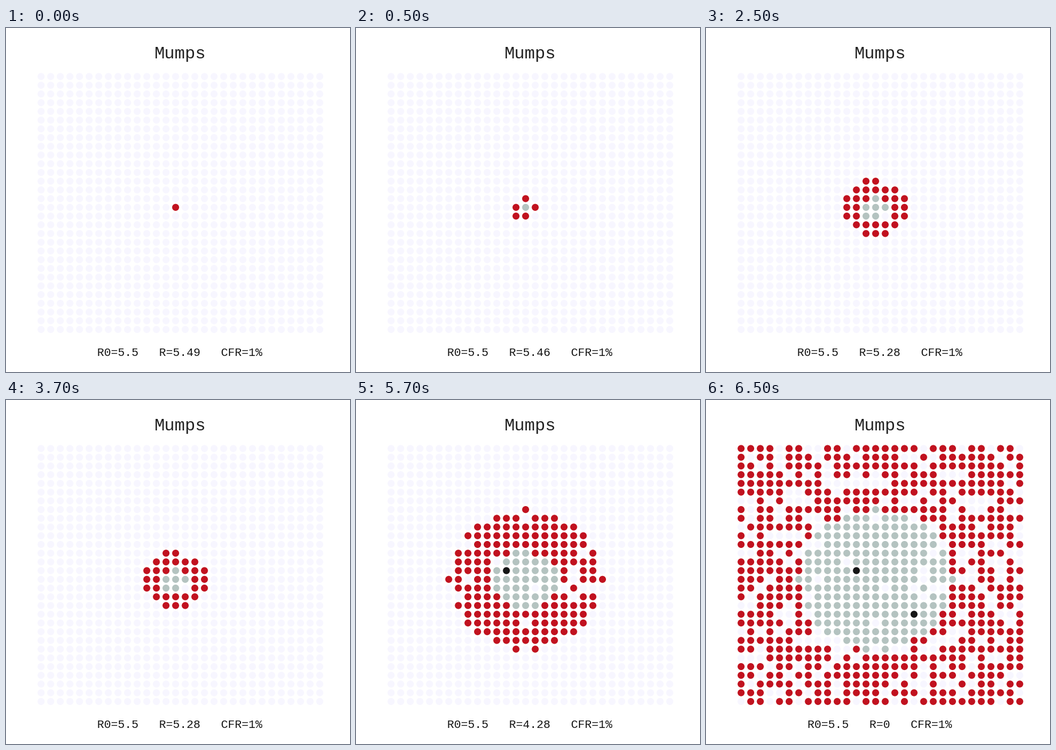
A matplotlib script that plays this animation: 600x600 px, repeating every 8000 ms.

```python
import numpy as np
import matplotlib.pyplot as plt
from matplotlib.animation import FuncAnimation

SIZE, DPI, N = 600, 100, 30
STEP_MS, LOOP_MS = 500, 8000
FIRST_MS, GENERATION_MS = 500, 2000
PX = 72 / DPI
HEALTHY, SICK, RECOVERED, DEAD = range(4)
PALETTE = np.array(["#f7f6ff", "#c1121f", "#b4c3c0", "#161616"])
R_VALUES = ("5.49", "5.46", "5.28", "4.28", "0")

# Squared distance reached by each generation; later ones reach everybody.
REACH = (0.1, 1.94, 10.18, 64.54)
# The small offset decides which of two equally distant people is infected.
CENTER = (13.996, 15.03)
IMMUNE = [(15, 16), (14, 8), (8, 11), (20, 12), (11, 13), (19, 14), (8, 15),
          (19, 15), (18, 16), (20, 16), (21, 16), (7, 17), (19, 17), (14, 20),
          (14, 23)]
DEATHS = {(12, 14): 3, (18, 19): 4}  # (column, row): generation
SPARED_SHARE = 0.26
NEVER = 99

col, row = np.meshgrid(np.arange(N), np.arange(N))


def infection_times():
    """Generation in which each person falls sick."""
    dist2 = (col - CENTER[0]) ** 2 + (row - CENTER[1]) ** 2
    time = np.searchsorted(REACH, dist2)
    spared = np.random.default_rng(5).random((N, N)) < SPARED_SHARE
    time[spared & (time == len(REACH))] = NEVER
    for c, r in IMMUNE:
        time[r, c] = NEVER
    return time


infected_at = infection_times()


def colors(generation):
    state = np.full((N, N), HEALTHY)
    state[infected_at < generation] = RECOVERED
    state[infected_at == generation] = SICK
    for (c, r), when in DEATHS.items():
        if generation >= when:
            state[r, c] = DEAD
    return PALETTE[state.ravel()]


fig = plt.figure(figsize=(SIZE / DPI, SIZE / DPI), dpi=DPI, facecolor="white")
ax = fig.add_axes([0, 0, 1, 1])
ax.set(xlim=(0, SIZE), ylim=(SIZE, 0))
ax.axis("off")

dots = ax.scatter(61.2 + 16.76 * col.ravel(), 84.6 + 15.215 * row.ravel(),
                  s=(12.2 * PX) ** 2, linewidths=0, c=colors(0))


def label(y, size, text, color):
    return ax.text(303.2, y, text, family="Liberation Mono", fontsize=size * PX,
                   color=color, ha="center", va="baseline")


label(53, 30, "Mumps", "#222222")
caption = label(572.5, 20, "", "#111111")


def update(frame):
    now = frame * STEP_MS
    generation = (now - FIRST_MS) // GENERATION_MS + 1
    dots.set_facecolor(colors(generation))
    caption.set_text(f"R0=5.5   R={R_VALUES[generation]}   CFR=1%")
    return dots, caption


anim = FuncAnimation(fig, update, frames=LOOP_MS // STEP_MS, interval=STEP_MS,
                     repeat=True, repeat_delay=0)
plt.show()
```
